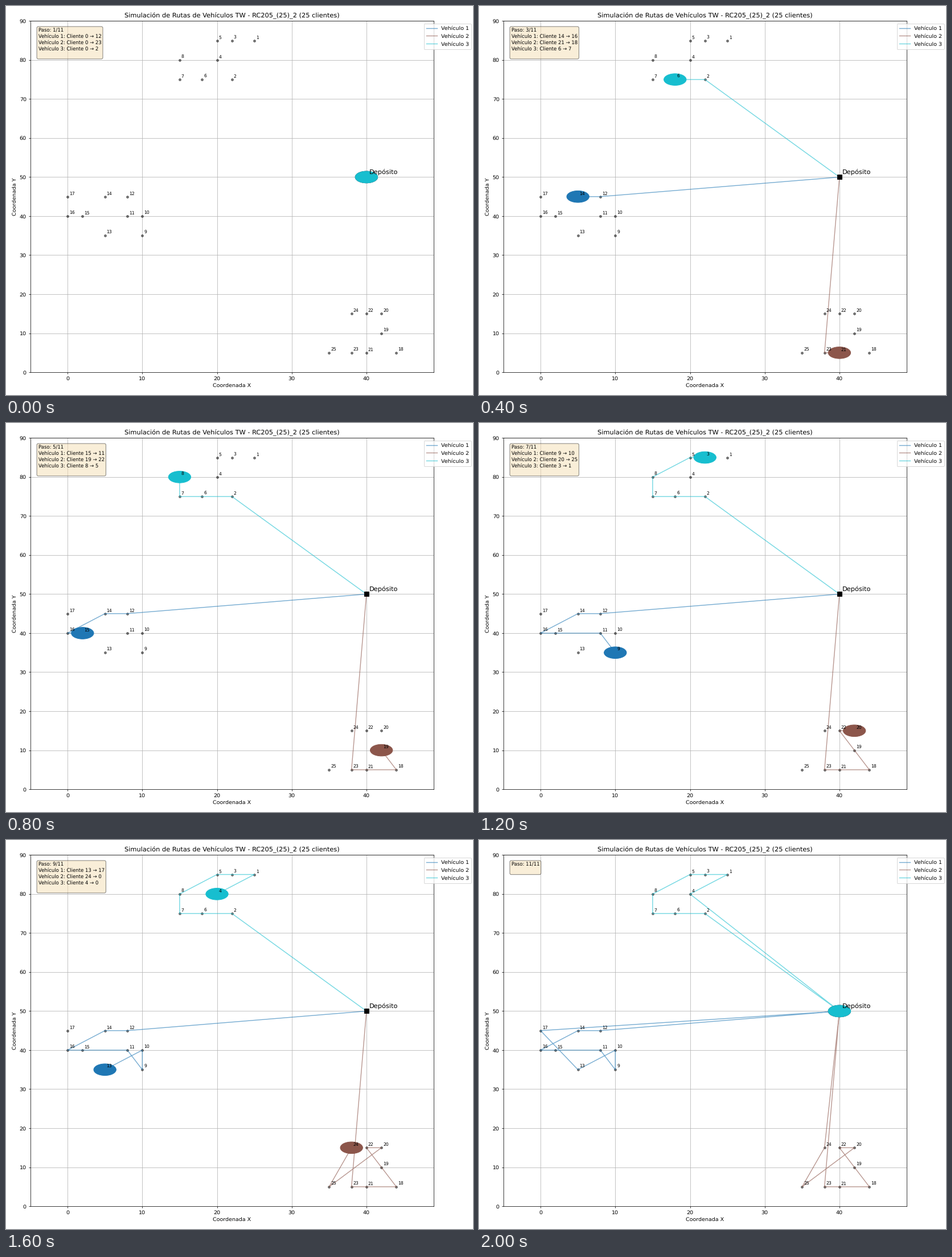
A matplotlib script for the animation above (2200 ms loop, 820 by 683 pixels).

```python
import matplotlib.pyplot as plt
from matplotlib.animation import FuncAnimation
from matplotlib.patches import Circle

plt.rcParams.update({"font.family": "DejaVu Sans", "text.hinting": "none"})

WIDTH, HEIGHT = 820, 683
DPI = WIDTH / 12
STEPS = 11

DEPOT = (40, 50)
# Customers of each vehicle in visiting order.
TOURS = [
    [(8, 45), (5, 45), (0, 40), (2, 40), (8, 40), (10, 35), (10, 40), (5, 35), (0, 45)],
    [(38, 5), (40, 5), (44, 5), (42, 10), (40, 15), (42, 15), (35, 5), (38, 15)],
    [(22, 75), (18, 75), (15, 75), (15, 80), (20, 85), (22, 85), (25, 85), (20, 80)],
]
COLORS = plt.cm.tab10([0.0, 0.5, 1.0])


def number_customers():
    """Number clusters from top to bottom, each from right to left, then upwards."""
    numbers = {DEPOT: 0}
    for tour in sorted(TOURS, key=lambda tour: -tour[0][1]):
        for point in sorted(tour, key=lambda p: (-p[0], p[1])):
            numbers[point] = len(numbers)
    return numbers


def label(text, point, offset, size):
    ax.annotate(text, point, xytext=(offset, offset),
                textcoords="offset points", fontsize=size)


NUMBERS = number_customers()
ROUTES = [[DEPOT, *tour, DEPOT] for tour in TOURS]

# The tiny surplus keeps rounding from losing a pixel.
fig, ax = plt.subplots(figsize=((WIDTH + 1e-4) / DPI, (HEIGHT + 1e-4) / DPI), dpi=DPI)
fig.subplots_adjust(left=42.5 / WIDTH, right=751 / WIDTH,
                    bottom=1 - 643.1 / HEIGHT, top=1 - 26.3 / HEIGHT)
ax.set(xlim=(-5, 49), ylim=(0, 90), xlabel="Coordenada X", ylabel="Coordenada Y")
ax.set_title("Simulación de Rutas de Vehículos TW - RC205_(25)_2 (25 clientes)")
ax.grid(True)

for point, number in NUMBERS.items():
    if point == DEPOT:
        ax.plot(*point, "ks", markersize=8, zorder=2.6)
        label("Depósito", point, 5, 12)
    else:
        ax.plot(*point, "ko", markersize=4, alpha=0.5)
        label(str(number), point, 3, 8)

trails, vehicles = [], []
for i, color in enumerate(COLORS, 1):
    trails += ax.plot([], [], color=color, alpha=0.6, label=f"Vehículo {i}")
    vehicles.append(ax.add_patch(Circle(DEPOT, 1.5, color=color, zorder=2.7)))

info = ax.text(0.02, 0.98, "", transform=ax.transAxes, va="top", fontsize=9,
               linespacing=1.3, bbox=dict(boxstyle="round", facecolor="wheat", alpha=0.5))
ax.legend(loc="upper right", bbox_to_anchor=(1.1, 1), labelspacing=0.55, borderpad=0.42)


def update(step):
    text = f"Paso: {step + 1}/{STEPS}\n"
    for i, (route, trail, vehicle) in enumerate(zip(ROUTES, trails, vehicles), 1):
        path = route[:step + 1]
        trail.set_data(*zip(*path))
        vehicle.center = path[-1]
        if step + 1 < len(route):
            start, end = NUMBERS[route[step]], NUMBERS[route[step + 1]]
            text += f"Vehículo {i}: Cliente {start} → {end}\n"
    info.set_text(text)
    return [*trails, *vehicles, info]


anim = FuncAnimation(fig, update, frames=STEPS, interval=200, repeat=True, repeat_delay=0)
plt.show()
```
